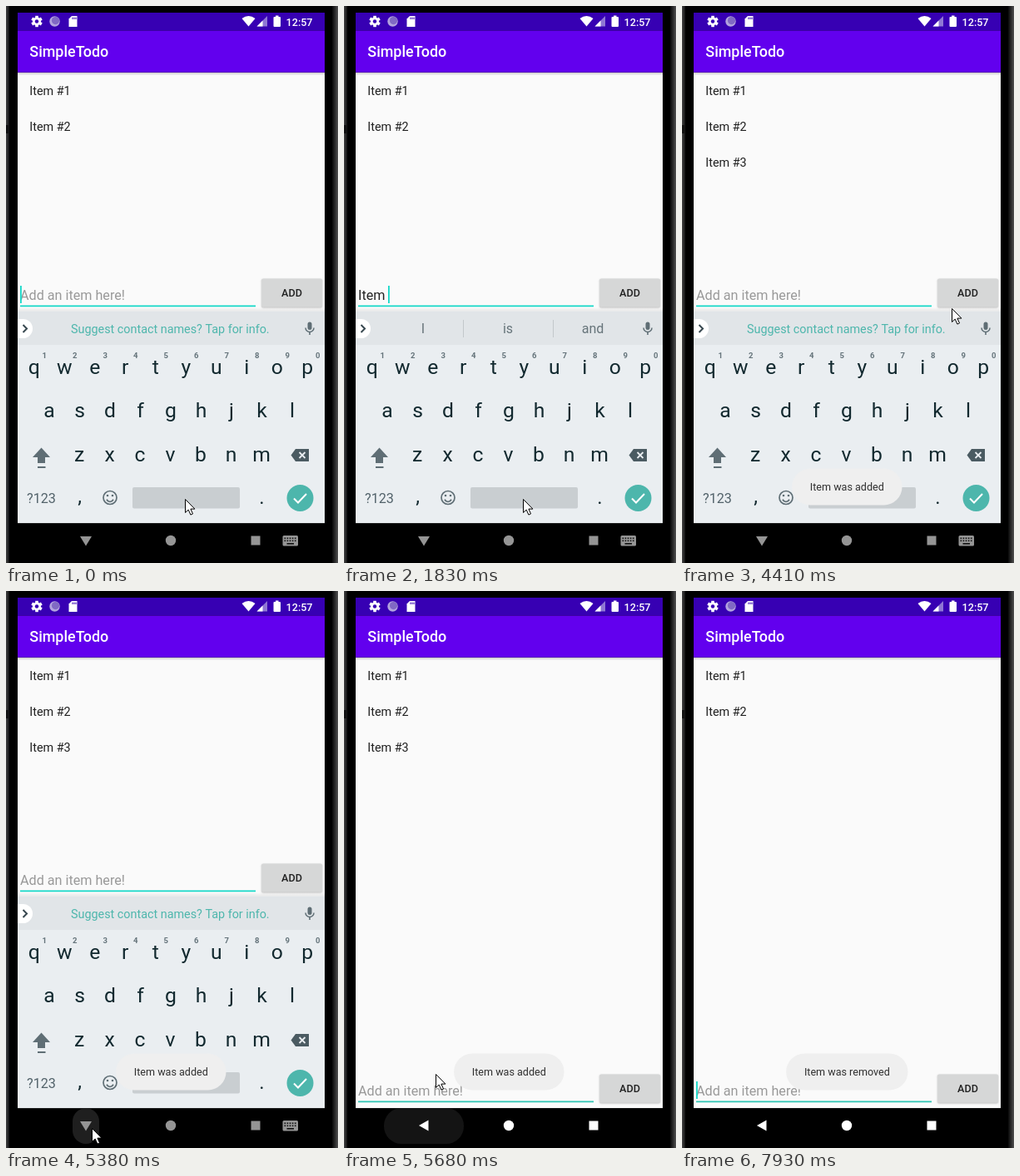
Recreate the animation shown at these times as an HTML page with a canvas. Size 399 by 669 pixels, loop 8000 ms.

```html
<!DOCTYPE html>
<html lang="en">
<head>
<meta charset="utf-8">
<title>Todo list</title>
<style>
  html, body { margin: 0; width: 100%; height: 100%; overflow: hidden; background: #000; }
  canvas { display: block; }
</style>
</head>
<body>
<canvas id="stage" width="399" height="669"></canvas>
<script>
const ctx = document.getElementById('stage').getContext('2d');
const LOOP = 8000, STEP = 142, BLINK = 500;
const ACCENT = '#14d8c8', TEAL = '#4db6ac', KEY = '#12292f', ICON = '#5f6e75', KEYS_BG = '#eaeef1';

// Edges of the screen parts, scaled from density-independent units
const dp = n => n * .898;
const TOP = 8, BAR = TOP + dp(24), LIST = BAR + dp(56), NAV = 621.2;

// Moments of the story in ms
const ADDED = 3980, BACK_PRESSED = 5380, KEYS_HIDDEN = 5520, REMOVED = 6820, POINTER_GONE = 7240;
const WORD = 'Item #3';
const STROKES = [700, 840, 1140, 1270, 1700, 2280, 2560];
// Pointer stops: step, x, y
const STOPS = [[22, 215, 592], [25, 374, 336], [30, 350, 343], [31, 324, 363],
  [37, 103, 645], [39, 103, 645], [40, 110, 580], [45, 74, 191]];

const clamp = v => Math.max(0, Math.min(1, v));
const mix = (a, b, k) => a + (b - a) * k;

function pointerAt(t) {
  const step = Math.floor(t / STEP);
  const i = Math.max(1, STOPS.findIndex(s => s[0] >= step));
  const last = STOPS.length - 1;
  const [a, b] = step > STOPS[last][0] ? [STOPS[last - 1], STOPS[last]] : [STOPS[i - 1], STOPS[i]];
  const k = clamp((step - a[0]) / (b[0] - a[0]));
  return [Math.round(mix(a[1], b[1], k)), Math.round(mix(a[2], b[2], k))];
}

function typedAt(t) {
  return t < ADDED ? WORD.slice(0, STROKES.filter(s => s <= t).length) : '';
}

// The caret restarts its blink on each stroke and when the keyboard leaves
function caretOn(t) {
  const origin = t < KEYS_HIDDEN ? STROKES.filter(s => s <= t).pop() || 0 : KEYS_HIDDEN + 410;
  return Math.floor((t - origin) / BLINK) % 2 === 0;
}

function hintsAt(t) {
  if (t < 1270 || t >= ADDED) return null;
  if (t < 1830) return ['Items', 'Item', 'Itemize'];
  return t < 2280 ? ['I', 'is', 'and'] : [];
}

function box(x, y, w, h, color, r = 0) {
  ctx.fillStyle = color;
  ctx.beginPath();
  ctx.roundRect(x, y, w, h, r);
  ctx.fill();
}
function dot(x, y, r, color) {
  ctx.fillStyle = color;
  ctx.beginPath();
  ctx.arc(x, y, r, 0, 7);
  ctx.fill();
}
function arc(x, y, r, from, to, color, width) {
  ctx.beginPath();
  ctx.arc(x, y, r, from, to);
  ctx.strokeStyle = color;
  ctx.lineWidth = width;
  ctx.stroke();
}
function trace(pts) {
  ctx.beginPath();
  for (let i = 0; i < pts.length; i += 2) ctx.lineTo(pts[i], pts[i + 1]);
}
function poly(color, ...pts) {
  trace(pts);
  ctx.fillStyle = color;
  ctx.fill();
}
function line(color, width, ...pts) {
  trace(pts);
  ctx.strokeStyle = color;
  ctx.lineWidth = width;
  ctx.stroke();
}
function text(s, x, y, size, color, align = 'left', weight = 400) {
  ctx.font = `${weight} ${size}px Roboto, sans-serif`;
  ctx.textAlign = align;
  ctx.fillStyle = color;
  ctx.fillText(s, x, y);
}
function blend(x0, y0, x1, y1, from, to) {
  const g = ctx.createLinearGradient(x0, y0, x1, y1);
  g.addColorStop(0, from);
  g.addColorStop(1, to);
  return g;
}
function shade(y, h, from, to) {
  box(14, y, 369, h, blend(0, y, 0, y + h, `rgba(0,0,0,${from})`, `rgba(0,0,0,${to})`));
}

function phone() {
  box(0, 0, 399, 669, '#000');
  box(0, 0, 4, 669, blend(0, 0, 4, 0, '#444', '#111'));
  box(392, 0, 7, 669, blend(392, 0, 399, 0, '#080808', '#505050'));
  box(0, 143, 3, 10, '#111');
}

function statusBar() {
  box(14, TOP, 369, BAR - TOP, '#3700b3');
  for (let i = 0; i < 6; i++) {
    const a = (i + .5) * Math.PI / 3, c = Math.cos(a), s = Math.sin(a);
    line('#fff', 3.6, 37 + 3 * c, 18.5 + 3 * s, 37 + 6.7 * c, 18.5 + 6.7 * s);
  }
  dot(37, 18.5, 5, '#fff');
  dot(37, 18.5, 2.2, '#3700b3');
  dot(58.5, 18.5, 6.2, '#b3a4de');
  dot(59.5, 17.6, 4.6, '#8069c4');
  poly('#fff', 79, 12, 85.5, 12, 85.5, 25, 75.5, 25, 75.5, 15.5);
  for (let i = 0; i < 3; i++) box(79.5 + 2 * i, 13.5, 1, 2.5, '#3700b3');
  ctx.beginPath();
  ctx.moveTo(291.5, 24.5);
  ctx.lineTo(283.5, 15);
  ctx.quadraticCurveTo(291.5, 9, 299.5, 15);
  ctx.fillStyle = '#fff';
  ctx.fill();
  poly('#8f77d4', 314, 12, 314, 24.5, 301.5, 24.5);
  poly('#fff', 308.5, 17.5, 308.5, 24.5, 301.5, 24.5);
  box(321.5, 13, 8.5, 12, '#fff', 1);
  box(324, 11.5, 3.5, 2, '#fff');
  text('12:57', 368.5, 23.5, dp(14), '#fff', 'right', 500);
}

function app(t, dy) {
  box(14, LIST, 369, NAV - LIST, '#fafafa');
  const items = t >= ADDED && t < REMOVED ? 3 : 2;
  for (let i = 0; i < items; i++) text('Item #' + (i + 1), 28.3, 106.5 + dp(48) * i, dp(16), '#202020');
  box(14, BAR, 369, LIST - BAR, '#6200ee');
  shade(LIST, 3.5, .2, 0);
  text('SimpleTodo', 28.3, 61, dp(20), '#fff', 'left', 500);

  ctx.save();
  ctx.translate(0, dy);
  const typed = typedAt(t);
  text(typed || 'Add an item here!', 17, 353, dp(18), typed ? '#222' : '#999');
  const width = typed ? ctx.measureText(typed).width : 0;
  if (typed && !typed.includes(' ')) box(17, 355, width, 1, '#222');
  box(17, 359.5, 283, 1.7, dy ? '#2fc4b4' : ACCENT);
  if (caretOn(t)) box(Math.floor(17 + width), 336, 1.8, 21, ACCENT);
  ctx.shadowColor = 'rgba(0,0,0,.25)';
  ctx.shadowBlur = 2;
  ctx.shadowOffsetY = .7;
  box(307, 327.6, 73, 34.2, '#d6d7d7', 2);
  ctx.restore();
  text('ADD', 343.5, 349 + dy, dp(14), '#222', 'center', 500);
}

function suggestions(t) {
  box(14, 366.4, 369, 40.6, '#e1e5e8');
  box(14, 376, 18, 23, '#fff', [0, 11.5, 11.5, 0]);
  line('#37474f', 2, 20.5, 383, 25, 387.5, 20.5, 392);
  const hints = hintsAt(t);
  if (!hints) {
    text('Suggest contact names? Tap for info.', 197.3, 393, dp(16), TEAL, 'center');
  } else if (hints.length) {
    hints.forEach((w, i) => text(w, 95 + 102 * i, 393, 16, '#66747a', 'center'));
    for (let i = 0; i < 2; i++) box(143 + 108 * i, 377, 1, 21, '#c3c8cb');
  }
  box(362.5, 379.5, 5, 9.5, ICON, 2.5);
  arc(365, 386.5, 5, 0, Math.PI, ICON, 1.5);
  box(364.2, 391, 1.6, 4, ICON);
}

function keyRow(letters, x, y, size = 24.7, color = KEY, weight = 400) {
  [...letters].forEach((c, i) => text(c, x + 36.5 * i, y, size, color, 'center', weight));
}

function keyboard(t) {
  shade(362, 4.4, 0, .07);
  box(14, 407, 369, NAV - 407, KEYS_BG);
  suggestions(t);
  keyRow('qwertyuiop', 33.8, 441.5);
  keyRow('1234567890', 46.3, 423, 9.5, '#64737a', 700);
  keyRow('asdfghjkl', 52, 494);
  keyRow('zxcvbnm', 88, 547);

  poly(ICON, 42.5, 530.5, 53, 542, 47, 542, 47, 549, 38, 549, 38, 542, 32, 542);
  box(38, 553, 9.5, 2, ICON);
  poly('#4b5b62', 342.5, 539.5, 348, 532, 364, 532, 364, 547, 348, 547);
  line(KEYS_BG, 1.8, 352.5, 536, 359.5, 543);
  line(KEYS_BG, 1.8, 359.5, 536, 352.5, 543);

  text('?123', 25, 596.5, dp(18), '#52626a');
  text(',', 88.5, 597, 24, KEY, 'center');
  text('.', 307.5, 598, 24, KEY, 'center');
  arc(125, 590.5, 8, 0, 7, ICON, 1.7);
  arc(125, 591, 4.3, .4, Math.PI - .4, ICON, 1.7);
  dot(122, 588, 1.3, ICON);
  dot(128, 588, 1.3, ICON);
  box(152, 578, 129, 25.5, '#c9ced1', 2);
  dot(353.5, 591, 16, TEAL);
  line('#fff', 2, 346, 591.5, 351, 596.5, 361, 586);
}

function navBar(t, open) {
  box(14, NAV, 369, 669 - NAV, '#000');
  const press = t - BACK_PRESSED;
  if (press >= 0 && press < 420) {
    const half = open ? 16 : 48;
    box(96 - half, 621, 2 * half, 43, open ? '#1f1f1f' : '#141414', Math.min(half, 21));
  }
  const c = open ? '#959595' : '#fff';
  if (open) poly(c, 89, 637, 103, 637, 96, 648.5);
  else poly(c, 90, 642, 101.5, 635.5, 101.5, 648.5);
  dot(198, 642, 6.2, c);
  box(294.5, 636.5, 11, 11, c);
  if (!open) return;
  box(332.5, 636, 18.5, 12.5, c, 1.5);
  for (let i = 0; i < 10; i++) box(334.5 + 3.1 * (i % 5), i < 5 ? 638.5 : 641.5, 1.6, 1.6, '#111');
  box(337.5, 645, 8.5, 1.6, '#111');
}

function toast(s, t, shown) {
  const age = t - shown;
  const alpha = Math.min(clamp(age / 280), clamp((2350 - age) / 250));
  if (alpha <= 0) return;
  ctx.globalAlpha = alpha;
  text(s, 198.3, 582, dp(14), '#303030', 'center');
  const w = ctx.measureText(s).width + 43.5;
  box(198.3 - w / 2, 555.5, w, 44, '#efefef', 22);
  text(s, 198.3, 582, dp(14), '#303030', 'center');
  ctx.globalAlpha = 1;
}

function pointer(x, y) {
  ctx.save();
  ctx.translate(x + .5, y + .5);
  poly('#fff', 0, 0, 0, 16, 3.7, 12.6, 6.4, 18.6, 9, 17.4, 6.4, 11.6, 11.4, 11.6);
  ctx.closePath();
  ctx.strokeStyle = '#000';
  ctx.lineWidth = 1;
  ctx.stroke();
  ctx.restore();
}

function draw(t) {
  const open = t < KEYS_HIDDEN;
  phone();
  statusBar();
  app(t, open ? 0 : 253);
  if (open) keyboard(t);
  navBar(t, open);
  toast('Item was added', t, ADDED);
  toast('Item was removed', t, REMOVED);
  if (t < POINTER_GONE) pointer(...pointerAt(t));
}

const start = performance.now();
function tick() {
  draw((performance.now() - start) % LOOP);
  requestAnimationFrame(tick);
}
tick();
</script>
</body>
</html>
```
